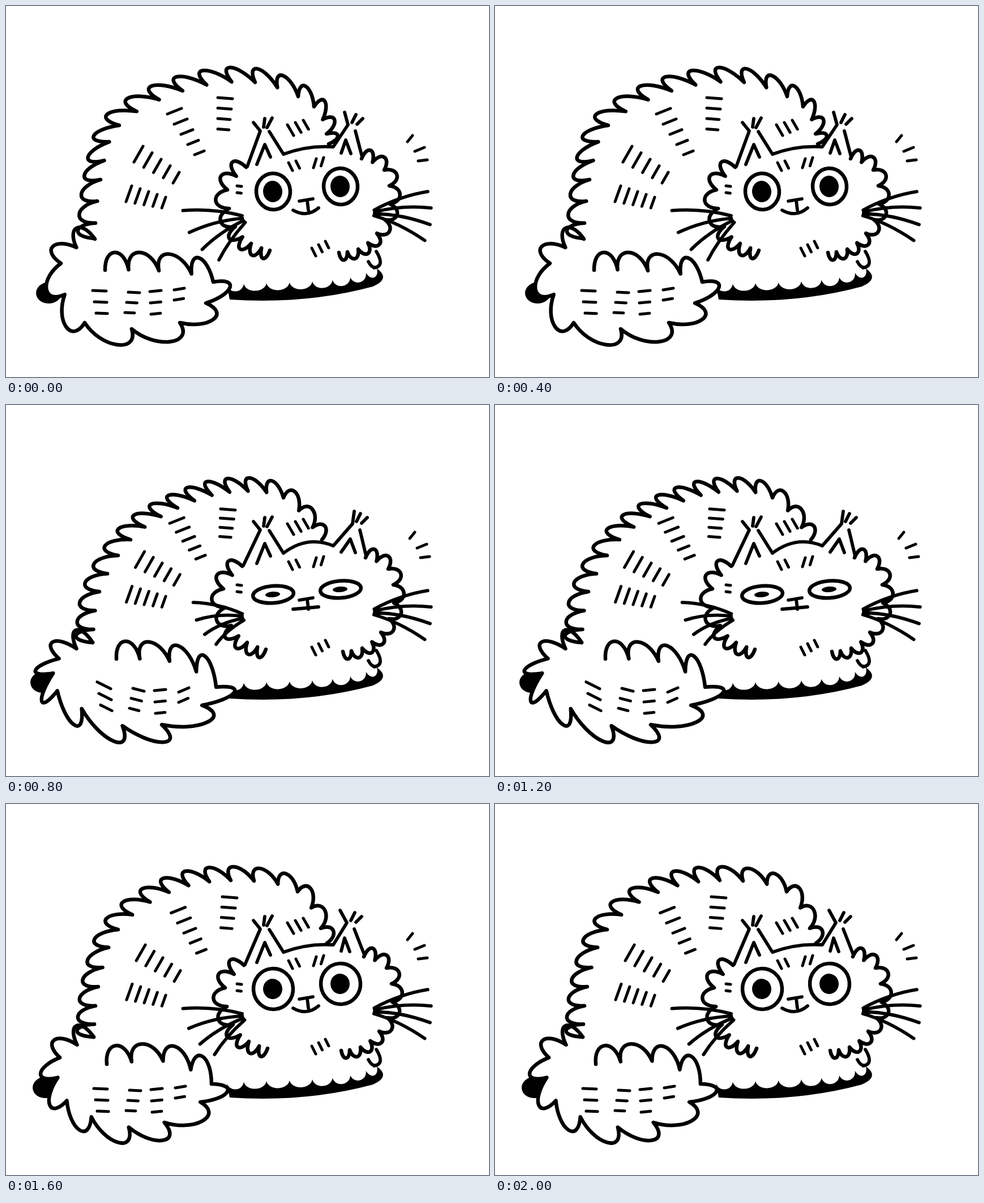
Write an HTML page with a canvas that moves like this. It is 853x656 px and loops after 2200 ms.

```html
<!DOCTYPE html>
<html>
<head>
<meta charset="utf-8">
<style>
html, body { margin: 0; width: 100%; height: 100%; overflow: hidden; background: #fff; }
canvas { display: block; }
</style>
</head>
<body>
<canvas id="stage" width="853" height="656"></canvas>
<script>
const ctx = document.getElementById('stage').getContext('2d');

// Each pose sets the guide lines of back and tail, and how far the features move.
const alert = {
  back: [[156, 411], [167, 307], [200, 211], [312, 150], [440, 135], [544, 178], [570, 244]],
  tail: [[157, 412], [97, 455], [139, 560], [307, 560], [366, 488], [270, 468], [175, 467]],
  backTufts: 18, backLean: -26, tailTufts: 12, tailLean: 22,
  paw: [76, 507], spread: 0, brow: 246, ear: 604, flick: -6, smile: 14,
  eye: { rx: 30, ry: 32, pupilX: 17, pupilY: 19, drop: 0 },
  whisker: { length: 118, from: -5, step: 20 },
  squash: [0, 0], tailShift: 0, tailTilt: 0, spark: [0, 0]
};
const wide = {
  ...alert,
  back: [[155, 412], [163, 323], [198, 222], [288, 156], [397, 135], [515, 155], [567, 246]],
  tail: [[155, 412], [93, 453], [118, 535], [248, 572], [364, 504], [285, 456], [178, 460]],
  backLean: -20, tailTufts: 13, tailLean: 24,
  paw: [70, 501], spread: 4, ear: 602, flick: -12,
  eye: { rx: 35, ry: 36, pupilX: 17, pupilY: 18, drop: -1 },
  whisker: { length: 118, from: -5, step: 18 },
  squash: [8, 2], tailShift: 2
};
const squint = {
  ...alert,
  back: [[153, 415], [168, 321], [240, 224], [343, 165], [462, 163], [562, 234]],
  tail: [[152, 414], [87, 453], [112, 531], [254, 572], [373, 494], [288, 458], [187, 452]],
  backTufts: 15, backLean: -18, tailTufts: 13, tailLean: 30,
  paw: [70, 498], spread: 6, brow: 230, ear: 607, smile: 2,
  eye: { rx: 36, ry: 25, pupilX: 19, pupilY: 12, drop: 1 },
  whisker: { length: 110, from: -6, step: 18 },
  squash: [16, 23], tailShift: 4, tailTilt: 11, spark: [20, -10]
};
const narrow = {
  ...squint,
  back: [[153, 420], [165, 330], [220, 238], [303, 182], [395, 154], [490, 164], [558, 238]],
  tail: [[153, 420], [91, 452], [100, 515], [240, 572], [371, 508], [296, 455], [195, 449]],
  backTufts: 18, backLean: -22, tailLean: 36,
  paw: [66, 490], spread: 7, ear: 612, flick: 3, smile: -2,
  eye: { rx: 36, ry: 15, pupilX: 13, pupilY: 5, drop: 7 },
  whisker: { length: 102, from: -13, step: 18 },
  squash: [5, 22], tailShift: 8, spark: [4, -4]
};
const raised = {
  ...narrow,
  back: narrow.back.map(([x, y]) => [x, 420 - (420 - y) * 1.05]),
  squash: [5, 10]
};

const CHEEK_LEFT = [[424, 285], [391, 325], [405, 390], [433, 420], [466, 432]];
const CHEEK_RIGHT = [[628, 270], [668, 290], [678, 350], [655, 402], [622, 430], [588, 436]];
const BELLY = [[390, 492], [460, 490], [541, 487], [608, 480], [655, 464]];

// Rows of dashes: count, start, step to the next dash, length of a dash.
const BACK_ROWS = [
  [4, 374, 162, 0, 18.5, 26, 2], [5, 285, 191, 12, 18, 25, -10],
  [5, 242, 248, 16, 11.5, -16, 28], [5, 222, 318, 15, 5, -10, 28]
];
const HEAD_ROWS = [
  [3, 497, 210, 14, -4, 11, 19], [2, 499, 277, 13, -3, 7, 14], [2, 548, 270, 13, -2, -5, 16],
  [2, 408, 318, 0, 12, 8, 1], [3, 540, 428, 12, -6, 7, 14]
];
const TAIL_ROWS = [
  [3, 153, 503, 3, 20, 24, 1], [3, 216, 506, -3, 18, 20, 1],
  [3, 254, 505, 1, 20, 20, -2], [2, 297, 502, 0, 18, 18, -3]
];

const shiftX = (keys, dx) => keys.map(([x, y]) => [x + dx, y]);

// Catmull-Rom point on the guide line, u from 0 to 1.
function along(keys, u) {
  const last = keys.length - 1;
  const i = Math.min(Math.floor(u * last), last - 1), f = u * last - i;
  const key = k => keys[Math.max(0, Math.min(last, k))];
  return [0, 1].map(axis => {
    const [a, b, c, d] = [-1, 0, 1, 2].map(k => key(i + k)[axis]);
    return b + f / 2 * (c - a + f * (2 * a - 5 * b + 4 * c - d + f * (3 * (b - c) + d - a)));
  });
}

// Rounded tufts on a guide line; the sign of height picks the side.
function traceFur(keys, count, height, lean = 0, taper = 0) {
  const round = (a, b) => a + (b - a) * 0.6;
  ctx.beginPath();
  ctx.moveTo(...keys[0]);
  for (let i = 0; i < count; i++) {
    const [ax, ay] = along(keys, i / count), [bx, by] = along(keys, (i + 1) / count);
    const u = (i + 0.5) / count, chord = Math.hypot(bx - ax, by - ay);
    const tx = (bx - ax) / chord, ty = (by - ay) / chord;
    const h = height * (1 - taper * u * u), slide = lean * Math.sin(Math.PI * u);
    const x = (ax + bx) / 2 + ty * h + tx * slide;
    const y = (ay + by) / 2 - tx * h + ty * slide;
    const dx = (bx - ax) * 0.43, dy = (by - ay) * 0.43;
    ctx.bezierCurveTo(round(ax, x - dx), round(ay, y - dy), round(x, x - dx), round(y, y - dy), x, y);
    ctx.bezierCurveTo(round(x, x + dx), round(y, y + dy), round(bx, x + dx), round(by, y + dy), bx, by);
  }
}

function fur(...shape) {
  traceFur(...shape);
  ctx.stroke();
}

function dashes(rows, place = (x, y) => [x, y], tilt = () => 0) {
  ctx.beginPath();
  for (const [count, x, y, stepX, stepY, lengthX, lengthY] of rows) {
    for (let i = 0; i < count; i++) {
      const [px, py] = place(x + i * stepX, y + i * stepY), size = 1 - i * 0.08;
      ctx.moveTo(px, py);
      ctx.lineTo(px + lengthX * size, py + (lengthY + tilt(x)) * size);
    }
  }
  ctx.stroke();
}

function whiskers(x, y, side, { length, from, step }) {
  ctx.beginPath();
  for (let i = 0; i < 4; i++) {
    const angle = (from + i * step) * Math.PI / 180;
    const at = r => [x + side * r * Math.cos(angle), y + r * Math.sin(angle)];
    const [midX, midY] = at(length * 0.55);
    ctx.moveTo(...at(13));
    ctx.quadraticCurveTo(midX, midY - 9, ...at(length - (side < 0 ? i * 8 : 0)));
  }
  ctx.stroke();
}

function oval(x, y, rx, ry) {
  ctx.beginPath();
  ctx.ellipse(x, y, rx, ry, -0.08, 0, Math.PI * 2);
}

function eye(x, y, { rx, ry, pupilX, pupilY, drop }) {
  oval(x, y + drop, rx, ry);
  ctx.stroke();
  oval(x - 1, y + drop, pupilX, pupilY);
  ctx.fill();
}

function face({ brow, ear, flick, smile, spread }) {
  ctx.stroke(new Path2D(`
    M${426 - spread} 284L449 221L437 206M465 222L490 262M455 214l2 -15M461 215l9 -17M443 280L457 245L467 267
    M490 262Q532 ${brow} 578 249L${ear} 210l${flick} -22M${ear + 13} 221L${629 + spread} 267
    M592 260L${ear - 4} 237L${ear + 5} 261M${ear + 7} 206l7 -14M${ear + 16} 209l10 -10
    M518 345L542 341M532 344L534 361M507 361Q531 ${361 + smile} 552 357
    M654 434Q670 460 650 463M640 452Q646 464 654 462`));
}

function drawCat(cat) {
  ctx.fillStyle = '#fff';
  ctx.fillRect(0, 0, 853, 656);
  ctx.fillStyle = ctx.strokeStyle = '#000';
  ctx.lineCap = ctx.lineJoin = 'round';

  // shadow
  traceFur(BELLY, 8, -13);
  ctx.quadraticCurveTo(680, 482, 648, 496);
  ctx.quadraticCurveTo(530, 528, 395, 519);
  ctx.fill();
  oval(...cat.paw, 23, 19);
  ctx.fill();

  ctx.lineWidth = 6.5;
  traceFur(cat.tail, cat.tailTufts, -31, cat.tailLean);
  ctx.fillStyle = '#fff';
  ctx.fill();
  ctx.stroke();
  ctx.fillStyle = '#000';
  fur(cat.back, cat.backTufts, 30, cat.backLean, 0.4);
  fur(shiftX(CHEEK_LEFT, -cat.spread), 8, -23, 0, 0.3);
  fur(shiftX(CHEEK_RIGHT, cat.spread), 10, 19, 0, 0.3);
  eye(472, 328, cat.eye);
  eye(591, 319, cat.eye);

  ctx.lineWidth = 5.8;
  face(cat);
  whiskers(430, 372, -1, cat.whisker);
  whiskers(638, 365, 1, { length: 113, from: -19, step: 15 });

  ctx.lineWidth = 5;
  const [pushX, pushY] = cat.squash;
  dashes(BACK_ROWS, (x, y) => {
    const k = (340 - y) / 180;
    return [x + pushX * k, y + pushY * k];
  });
  dashes(HEAD_ROWS);
  const tilt = x => cat.tailTilt * (254 - x) / 100;
  dashes(TAIL_ROWS, (x, y) => [x + cat.tailShift, y - tilt(x) * 1.2], tilt);

  const [sparkX, sparkY] = cat.spark;
  ctx.stroke(new Path2D(`M${718 + sparkX} ${229 + sparkY}l-9 11m30 10l-17 7m22 15l-16 2`));
}

const poses = [alert, wide, alert, squint, narrow, raised, narrow, squint, wide, alert, wide];
const HOLD = 200;
const start = performance.now();

function tick() {
  const elapsed = Math.max(0, performance.now() - start);
  drawCat(poses[Math.floor(elapsed / HOLD) % poses.length]);
  requestAnimationFrame(tick);
}
tick();
</script>
</body>
</html>
```
